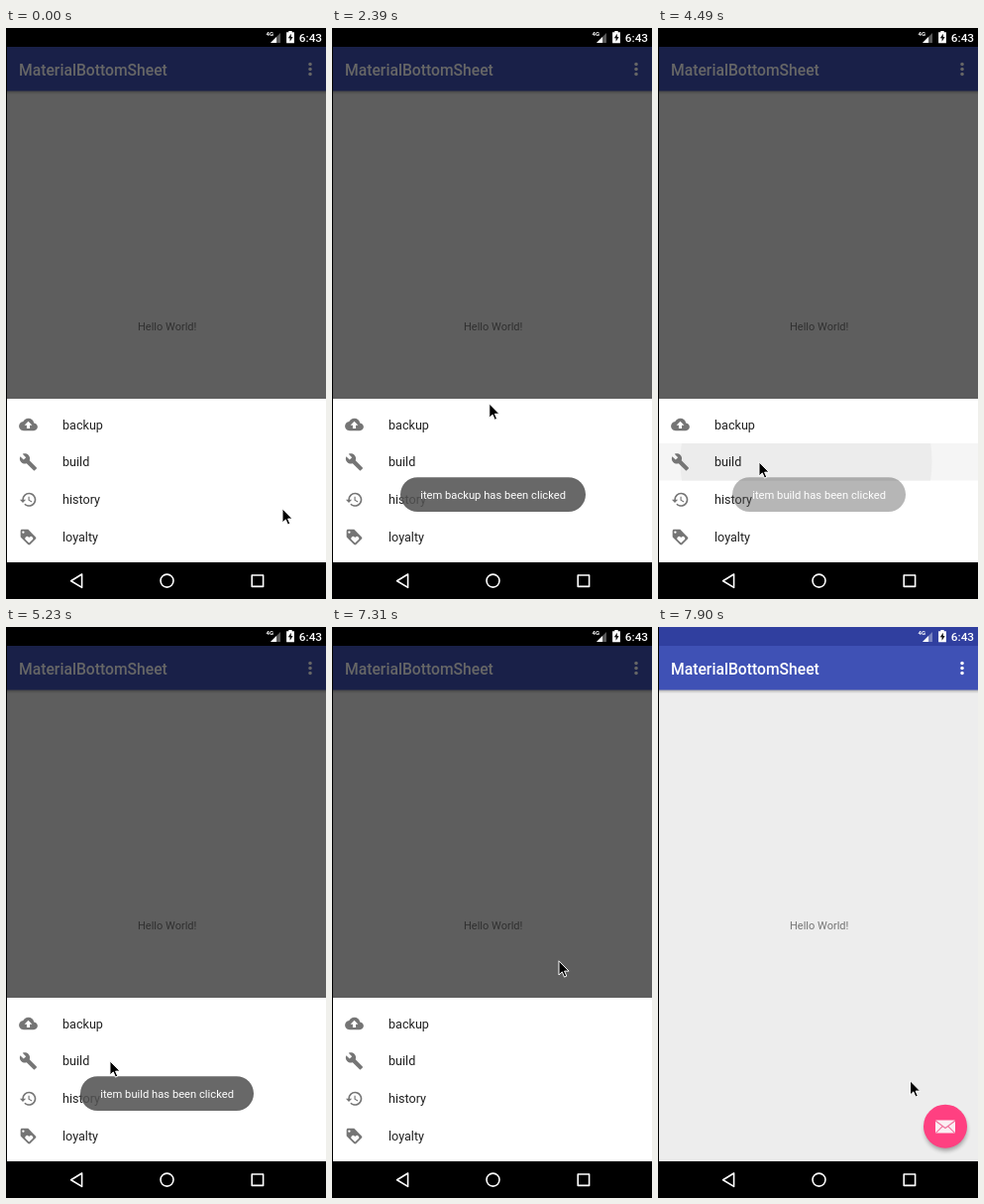
An HTML page for the animation above (8000 ms loop, 323 by 576 pixels).

```html
<!DOCTYPE html>
<html lang="en">
<head>
<meta charset="utf-8">
<title>Bottom sheet</title>
<style>
  html, body { margin: 0; height: 100%; overflow: hidden; background: #000; }
  svg { display: block; width: 100%; height: 100%; font-family: Roboto, sans-serif; }
  .title { font-size: 15.7px; font-weight: 500; fill: #fff; }
  .item { font-size: 12.6px; fill: #212121; }
  .icon { fill: #757575; fill-rule: evenodd; }
  .toast text { font-size: 11.2px; fill: #fff; text-anchor: middle; }
  .toast rect { fill: #525252; fill-opacity: .87; }
</style>
</head>
<body>
<svg viewBox="0 0 323 576">
  <defs>
    <linearGradient id="shade" x2="0" y2="1">
      <stop stop-color="#000" stop-opacity=".28"/>
      <stop offset="1" stop-color="#000" stop-opacity="0"/>
    </linearGradient>
    <filter id="blur" x="-30%" y="-30%" width="160%" height="160%"><feGaussianBlur stdDeviation="2"/></filter>
    <clipPath id="app"><rect width="323" height="539"/></clipPath>
    <clipPath id="row0"><rect x="1" y="381" width="322" height="37.5"/></clipPath>
    <clipPath id="row1"><rect x="1" y="419" width="322" height="37.5"/></clipPath>
  </defs>

  <!-- activity -->
  <rect width="323" height="539" fill="#ededed"/>
  <rect y="63" width="323" height="4" fill="url(#shade)"/>
  <rect y="19" width="323" height="44.5" fill="#3f51b5"/>
  <text class="title" x="13" y="47.5">MaterialBottomSheet</text>
  <g fill="#fff">
    <circle cx="307" cy="36.4" r="1.75"/><circle cx="307" cy="41.5" r="1.75"/><circle cx="307" cy="46.6" r="1.75"/>
  </g>
  <text x="162.7" y="305" font-size="11" fill="#757575" text-anchor="middle">Hello World!</text>
  <circle cx="290.5" cy="507" r="21.5" opacity=".32" filter="url(#blur)"/>
  <circle cx="290" cy="503.7" r="22" fill="#ff4081"/>
  <rect x="280" y="497.5" width="20" height="13" rx="1" fill="#fbeef3"/>
  <path d="M280 498l10 7.5 10-7.5M280.5 510.3l6.5-6.5M299.5 510.3l-6.5-6.5" fill="none" stroke="#f0709c" stroke-width="1.1"/>
  <rect id="scrim" y="19" width="323" height="520"/>

  <!-- status bar -->
  <rect width="323" height="19" fill="#303f9f"/>
  <rect id="barScrim" width="323" height="19"/>
  <g fill="#fff">
    <text x="295.8" y="13.6" font-size="11.8" font-weight="500">6:43</text>
    <text x="262.6" y="8.2" font-size="6" font-weight="700">4G</text>
    <path d="M277 5v10h-10z" opacity=".35"/>
    <path d="M273 9v6h-6z"/>
    <path d="M285.3 3h3.4v1.3h2.2v10.9h-7.8V4.3h2.2z"/>
    <path d="M287.8 5.8l-3 4.5h1.8v3.4l3-4.7h-1.8z" fill="#111"/>
  </g>

  <!-- sheet -->
  <g clip-path="url(#app)">
    <g id="sheet">
      <rect y="374" width="323" height="240" fill="#fff"/>
      <g clip-path="url(#row0)"><circle id="ripple0" cx="159.7" cy="399.5" fill="#ececec"/></g>
      <g id="press" clip-path="url(#row1)">
        <rect y="419" width="323" height="38" fill="#f5f5f5"/>
        <circle id="ripple1" cx="149.5" cy="437.5" fill="#ececec"/>
      </g>
      <g id="items"></g>
    </g>
  </g>

  <!-- navigation bar -->
  <rect y="539" width="323" height="37"/>
  <g fill="none" stroke="#fff" stroke-width="1.6" stroke-linejoin="round">
    <path d="M76.6 551v13.4l-11-6.7z"/>
    <circle cx="162.5" cy="557.6" r="6.5"/>
    <rect x="248.2" y="552" width="11.4" height="11.4"/>
  </g>

  <g class="toast" id="toast0">
    <rect x="69" y="453.3" width="187" height="34.7" rx="17.3"/>
    <text x="162.6" y="475">item backup has been clicked</text>
  </g>
  <g class="toast" id="toast1">
    <rect x="75" y="453.3" width="175" height="34.7" rx="17.3"/>
    <text x="162.6" y="475">item build has been clicked</text>
  </g>
  <rect width="1" height="576"/>
  <path id="cursor" d="M0 .8v14.2l3.3-3.1 2.2 5.2 2.3-1-2.2-5h4.5z" stroke="#fff" stroke-width="1"/>
</svg>
<script>
const LOOP = 8000, STEP = 148.8;
const $ = id => document.getElementById(id);
const set = (id, name, value) => $(id).setAttribute(name, value);

const items = {
  backup: 'M19.35 10.04C18.67 6.59 15.64 4 12 4 9.11 4 6.6 5.64 5.35 8.04 2.34 8.36 0 10.91 0 14c0 3.31 2.69 6 6 6h13c2.76 0 5-2.24 5-5 0-2.64-2.05-4.78-4.65-4.96zM14 13v4h-4v-4H7l5-5 5 5z',
  build: 'M22.7 19l-9.1-9.1c.9-2.3.4-5-1.5-6.9-2-2-5-2.4-7.4-1.3L9 6 6 9 1.6 4.7C.4 7.1.9 10.1 2.9 12.1c1.9 1.9 4.6 2.4 6.9 1.5l9.1 9.1c.4.4 1 .4 1.4 0l2.3-2.3c.5-.4.5-1.1.1-1.4z',
  history: 'M13 3a9 9 0 0 0-9 9H1l4 4 4-4H6a7 7 0 1 1 2.06 4.94l-1.42 1.42A9 9 0 1 0 13 3zm-1 5v5l4.28 2.54.72-1.21-3.5-2.08V8z',
  loyalty: 'M21.4 11.6l-9-9C12 2.2 11.5 2 11 2H4c-1.1 0-2 .9-2 2v7c0 .55.22 1.05.6 1.4l9 9c.8.8 2 .8 2.8 0l7-7c.8-.8.8-2 0-2.8zM5.5 7a1.5 1.5 0 1 1 0-3 1.5 1.5 0 0 1 0 3zM17.3 15.3L13 19.5l-4.3-4.2a2.5 2.5 0 0 1 3.6-3.5l.7.7.7-.7a2.5 2.5 0 0 1 3.6 3.5z'
};
$('items').innerHTML = Object.entries(items).map(([name, d], i) => {
  const y = 400 + i * 37.9;
  return `<path class="icon" transform="translate(13.1 ${y - 9.4}) scale(.783)" d="${d}"/>
    <text class="item" x="57" y="${y + 4.5}">${name}</text>`;
}).join('');

// Tracks are [step, value...] keys.
const linear = u => u, smooth = u => u * u * (3 - 2 * u);
function track(keys, n, ease = linear) {
  const i = keys.findIndex(k => k[0] > n);
  if (i < 0) return keys[keys.length - 1].slice(1);
  if (i === 0) return keys[0].slice(1);
  const a = keys[i - 1], b = keys[i];
  const u = ease((n - a[0]) / (b[0] - a[0]));
  return a.slice(1).map((v, j) => v + (b[j + 1] - v) * u);
}

const path = [[1, 279, 484], [7, 151, 394], [15, 151, 394], [18, 181, 333], [20, 181, 333],
  [23, 100.5, 443], [26, 102, 437], [33, 102, 437], [36, 106, 437], [43, 106, 437],
  [48, 229, 336], [50, 229, 336], [53, 254.5, 457]];
const toast = (n, start, end) => track([[start, 0], [start + 1, .48], [start + 2, .9],
  [start + 3, 1], [end, 1], [end + 1, .77], [end + 4, 0]], n);
const ripple = (n, start, r) => ({
  r: track([[start, 0], [start + 2, r]], n),
  opacity: track([[start + 2, 1], [start + 4, 0]], n)
});

function draw(time) {
  const n = Math.floor(time % LOOP / STEP);
  set('cursor', 'transform', `translate(${track(path, n, smooth)})`);
  set('toast0', 'opacity', toast(n, 8, 22));
  set('toast1', 'opacity', toast(n, 29, 43));

  const first = ripple(n, 7, 120), second = ripple(n, 28, 127);
  set('ripple0', 'r', first.r);
  set('ripple0', 'opacity', first.opacity);
  set('ripple1', 'r', second.r);
  set('press', 'opacity', n > 28 ? second.opacity : 0);

  const open = track([[49, 1], [51, 0]], n)[0];
  set('scrim', 'opacity', .6 * open);
  set('barScrim', 'opacity', open);
  set('sheet', 'transform', `translate(0 ${198 * (1 - open)})`);
  set('sheet', 'opacity', open === 1 ? 1 : .2 * open);
}

const begin = performance.now();
function tick() {
  draw(performance.now() - begin);
  requestAnimationFrame(tick);
}
tick();
</script>
</body>
</html>
```
